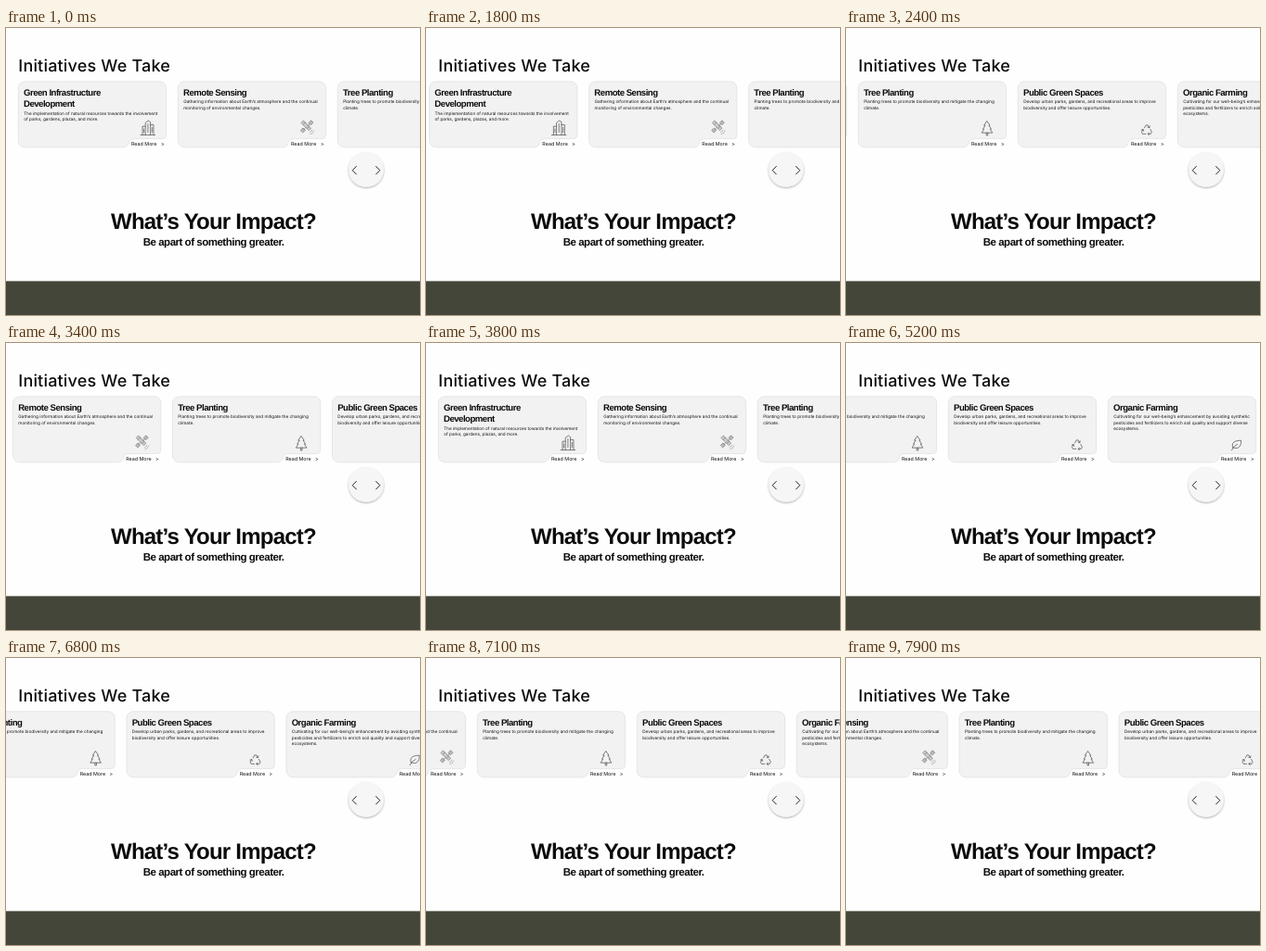
An HTML page for the animation above (8 s loop, 446 px wide and 310 px high).

```html
<!DOCTYPE html>
<html lang="en">
<head>
<meta charset="utf-8">
<title>Initiatives We Take</title>
<style>
html, body { margin: 0; width: 100%; height: 100%; overflow: hidden; background: #fefefe; }
svg { display: block; width: 446px; height: 310px; }
text { text-rendering: geometricPrecision; fill: #0c0c0c; }
.head { font: 500 18px Inter, sans-serif; letter-spacing: .18px; }
.big { font: 700 24px "Liberation Sans", Arial, sans-serif; letter-spacing: -.77px; }
.sub { font: 700 11.5px "Liberation Sans", Arial, sans-serif; letter-spacing: -.48px; }
.title { font: 700 9.6px "Liberation Sans", Arial, sans-serif; letter-spacing: -.5px; }
.body { font: 400 4.66px Inter, sans-serif; fill: #111; }
.more { font: 400 5.35px Inter, sans-serif; }
.icon { fill: none; stroke: #4a4a4a; stroke-width: .7; stroke-linecap: round; stroke-linejoin: round; }
.chev { fill: none; stroke: #222; stroke-width: 1; }
</style>
</head>
<body>
<svg viewBox="0 0 446 310">
  <defs>
    <filter id="shadow" x="-20%" y="-20%" width="140%" height="150%">
      <feDropShadow dx="0" dy="1" stdDeviation="0.8" flood-color="#000" flood-opacity=".36"/>
    </filter>
  </defs>
  <rect width="446" height="310" fill="#fefefe"/>
  <text class="head" x="13.3" y="46.6">Initiatives We Take</text>
  <g id="track"></g>
  <circle cx="388" cy="153" r="18.8" fill="#f6f6f6" filter="url(#shadow)"/>
  <path class="chev" d="M377.6 149.2L373.2 153.7L377.6 158.2M398.4 149.2L402.8 153.7L398.4 158.2"/>
  <text class="big" x="223.5" y="217" text-anchor="middle">What’s Your Impact?</text>
  <text class="sub" x="223.6" y="235" text-anchor="middle">Be apart of something greater.</text>
  <rect y="273.4" width="446" height="37" fill="#45463a"/>
</svg>
<script>
const PITCH = 172, LEFT = 13, LOOP = 8000, STEP = 100;

const icons = {
  city: '<path d="M132 115.6H147.6M137.2 115.6V102.4L140.4 100L142.6 101.6V115.6M134 115.6V106.2H137.2M142.6 104.6H146V115.6M139.9 103.6V112.6M144.3 107.4V112.8M135.6 109V113"/>',
  satellite: '<g stroke="#666" stroke-width=".6"><path fill="#bbb" d="M141.2 102.2L143.6 99.8L146 102.2L143.6 104.6ZM132.6 110.4L135 108L137.4 110.4L135 112.8Z"/><path fill="#ccc" d="M133.2 102.2L135.4 100L143.6 108.2L141.4 110.4Z"/><path d="M142.4 103.4L140 105.8M136.2 109.2L138.4 107M135.2 104.2L137.4 102M139.4 108.4L141.6 106.2"/><path d="M142.2 112.6Q144.4 112.4 144.8 110.2M142.6 114.8Q146.2 114.4 146.8 110.8" stroke="#999"/></g>',
  tree: '<path d="M139 100.8L142 105.2H140.9L143.5 109.2H142.3L144.8 113.2H133.2L135.7 109.2H134.5L137.1 105.2H136ZM138.2 113.2V116H139.8V113.2"/>',
  recycle: '<path d="M136.5 107.9L138.2 104.9H140.2L141.8 107.6M142.2 105.9L141.8 107.7L140 107.2M142.8 109.4L144.4 112.2L143.3 114.4H140.2M141.5 113.1L140.1 114.4L141.5 115.7M137.9 114.4H134.5L133.4 112.4L135 109.7M133.3 110.1L135.1 109.6L135.6 111.3"/>',
  leaf: '<path d="M133.4 115.8Q134.4 112 139.6 109.4M134.8 113.2C132.6 108.2 136.2 105.2 143.6 105.2C144 111.6 140.8 115.2 135.2 113"/>'
};

const cards = [
  [['Green Infrastructure', 'Development'], ['The implementation of natural resources towards the involvement', 'of parks, gardens, plazas, and more.'], 'city'],
  [['Remote Sensing'], ['Gathering information about Earth’s atmosphere and the continual', 'monitoring of environmental changes.'], 'satellite'],
  [['Tree Planting'], ['Planting trees to promote biodiversity and mitigate the changing', 'climate.'], 'tree'],
  [['Public Green Spaces'], ['Develop urban parks, gardens, and recreational areas to improve', 'biodiversity and offer leisure opportunities.'], 'recycle'],
  [['Organic Farming'], ['Cultivating for our well-being’s enhancement by avoiding synthetic', 'pesticides and fertilizers to enrich soil quality and support diverse', 'ecosystems.'], 'leaf']
];

const line = (cls, x, y, str) => `<text class="${cls}" x="${x}" y="${y}">${str}</text>`;

// Rounded panel with a tab cut out at the lower right for the link
const panel = '<path fill="#f3f2f3" stroke="#dedede" stroke-width=".7" d="M7.3 57.8H152.6A7 7 0 0 1 159.6 64.8V115.6Q159.6 119.6 155.6 119.6H124.5Q120.5 119.6 119.4 123.6Q118 128.8 113.5 128.8H7.3A7 7 0 0 1 .3 121.8V64.8A7 7 0 0 1 7.3 57.8Z"/>';

function card([titles, body, icon], i) {
  const top = 81.4 + (titles.length - 1) * 12.1;
  return `<g transform="translate(${LEFT + i * PITCH})">` + panel +
    titles.map((s, n) => line('title', 6, 73.2 + n * 12, s)).join('') +
    body.map((s, n) => line('body', 6.2, top + n * 6.5, s)).join('') +
    `<g class="icon">${icons[icon]}</g>` +
    line('more', 122, 127, 'Read More') + line('more', 153.9, 127, '&gt;') + '</g>';
}

const track = document.getElementById('track');
track.innerHTML = cards.map(card).join('');

// start, duration, from, to, skew
const moves = [
  [1738, 620, 0, 344, 1],
  [3097, 620, 344, 0, 1],
  [4156, 620, 0, 344, 1],
  [4850, 340, 344, 419, 1],
  [6710, 740, 419, 247, .74],
  [7801, 620, 247, 75, 1]
];

function scrollAt(t) {
  let pos = 0;
  for (const [start, dur, from, to, skew] of moves) {
    if (t < start) break;
    const x = Math.min(1, (t - start) / dur) ** skew;
    pos = from + (to - from) * x * x * (3 - 2 * x);
  }
  return pos;
}

function draw(now) {
  const t = Math.floor((now % LOOP) / STEP) * STEP;
  track.setAttribute('transform', `translate(${-scrollAt(t).toFixed(2)})`);
}

function tick() {
  draw(performance.now());
  requestAnimationFrame(tick);
}
tick();
</script>
</body>
</html>
```
